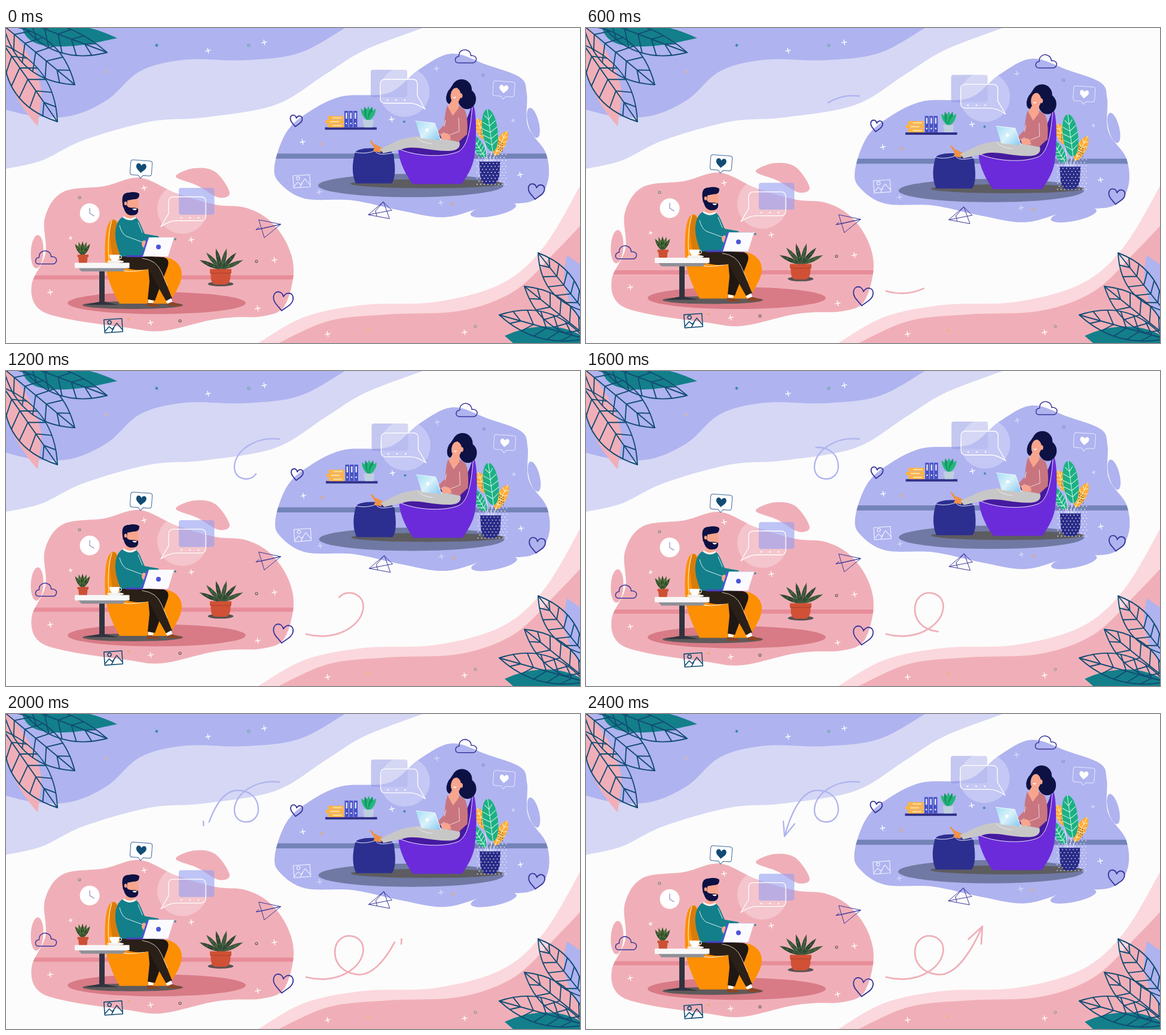
Recreate the animation shown at these times as an HTML page with a canvas. Size 960 by 528 pixels, loop 2.5 s.

```html
<!DOCTYPE html>
<html lang="en">
<head>
<meta charset="utf-8">
<title>Working from home</title>
<style>
html, body { margin: 0; width: 100%; height: 100%; overflow: hidden; background: #fcfcfc; }
canvas { display: block; }
</style>
</head>
<body>
<canvas id="stage" width="960" height="528"></canvas>
<script>
const ctx = document.getElementById('stage').getContext('2d');
const LOOP = 2500, STEP = 100, RISE = 18;
const LILAC = '#afb3ef', PALE = '#d5d7f5', PINK = '#f0afb8', BLUSH = '#fbd8dd',
  TEAL = '#137f8a', INK = '#124c74', NAVY = '#2c2f8f', INDIGO = '#3a379b',
  SKIN = '#f8a58d', WHITE = '#fff', HAIR = '#0d1143', MIST = '#d8daf9';

// Basic drawing helpers
const path = d => typeof d === 'string' ? new Path2D(d) : d;
const points = text => text.split(' ').map(p => p.split(',').map(Number));
function fill(d, color) {
  ctx.fillStyle = color;
  ctx.fill(path(d));
}
function line(d, color, w = 1.2) {
  ctx.strokeStyle = color;
  ctx.lineWidth = w;
  ctx.stroke(path(d));
}
function ellipse(x, y, rx, ry, color, turn = 0) {
  ctx.beginPath();
  ctx.ellipse(x, y, rx, ry, turn, 0, 7);
  ctx.fillStyle = color;
  ctx.fill();
}
const dot = (x, y, r, color) => ellipse(x, y, r, r, color);
function box(x, y, w, h, r, color) {
  const p = new Path2D();
  p.roundRect(x, y, w, h, r);
  fill(p, color);
}
function ring(x, y, color, r = 2) {
  ctx.beginPath();
  ctx.arc(x, y, r, 0, 7);
  ctx.strokeStyle = color;
  ctx.lineWidth = 1.1;
  ctx.stroke();
}
function pluses(text, color = WHITE, r = 4) {
  for (const [x, y] of points(text))
    line(`M${x - r} ${y + .8}l${2 * r} -1.6M${x - .8} ${y - r}l1.6 ${2 * r}`, color, 1.4);
}
function place(x, y, turn, size, draw) {
  ctx.save();
  ctx.translate(x, y);
  ctx.rotate(turn);
  ctx.scale(size, size);
  draw();
  ctx.restore();
}

// Smooth curve through "x,y x,y ..." key points
function spline(text, closed) {
  const pts = points(text), n = pts.length;
  const at = i => closed ? pts[(i + n) % n] : pts[Math.max(0, Math.min(n - 1, i))];
  const p = new Path2D();
  p.moveTo(...pts[0]);
  for (let i = 0; i < (closed ? n : n - 1); i++) {
    const [a, b, c, d] = [at(i - 1), at(i), at(i + 1), at(i + 2)];
    p.bezierCurveTo(b[0] + (c[0] - a[0]) / 6, b[1] + (c[1] - a[1]) / 6,
      c[0] - (d[0] - b[0]) / 6, c[1] - (d[1] - b[1]) / 6, c[0], c[1]);
  }
  if (closed) p.closePath();
  return p;
}
function wave(text, x, y) {
  const p = spline(text);
  p.lineTo(x, y);
  p.closePath();
  return p;
}

// Leaf from base to tip; up and down bulge its sides, a small `ends` rounds it
function leaf(ax, ay, bx, by, up, down, { color, vein, w = 1, n = 0, rim, ends = .33 }) {
  const len = Math.hypot(bx - ax, by - ay), c = ends * len, e = len - c;
  place(ax, ay, Math.atan2(by - ay, bx - ax), 1, () => {
    const edge = `M0 0C${c} ${-up} ${e} ${-up} ${len} 0C${e} ${down} ${c} ${down} 0 0`;
    if (color) fill(edge, color);
    if (rim) line(edge, vein, w);
    if (!vein) return;
    let d = `M0 0H${len}`;
    for (let i = 1; i <= n; i++) {
      const s = i / (n + 1) * .9, q = s + .11, k = 3 * q * (1 - q);
      d += `M${q * len} ${-k * up}L${s * len} 0L${q * len} ${k * down}`;
    }
    line(d, vein, w);
  });
}
function fan(x, y, n, spread, rx, ry, width, colors, vein) {
  for (let i = 0; i < n; i++) {
    const a = spread * (2 * i / (n - 1) - 1);
    leaf(x, y, x + rx * Math.sin(a), y - ry * Math.cos(a), width, width,
      { color: colors[i % 2], vein, w: .6, n: 2 });
  }
}

// Icons
const HEART = 'M0 .47C-.2 .25-.5 .1-.5-.18C-.5-.52-.12-.56 0-.25C.12-.56.5-.52.5-.18C.5 .1 .2 .25 0 .47Z';
const heart = (x, y, size, color) => place(x, y, .1, size, () => fill(HEART, color));
const heartLine = (x, y, size) => place(x, y, .13, size, () => line(HEART, INDIGO, 1.9 / size));
const cloud = (x, y) => place(x, y, 0, 1, () => line(
  'M-12 11C-19 11-19 1-11 0C-12-9-3-13 3-10C8-8 9-4 9-1C16-2 20 3 17 8C16 10 14 11 12 11Z', INDIGO, 1.5));
const picture = (x, y, size, color, w) => place(x, y, -.07, size, () => line(
  'M-15-11H15V11H-15ZM-3-6A3 3 0 1 1-9-6A3 3 0 1 1-3-6M-15 9L-7 1L-2 6L6-4L15 8M-4 11L1 3', color, w));
function heartBubble(x, y, bg, edge, color, size) {
  place(x, y, .07, 1, () => {
    const d = 'M-14-13H14Q18-13 18-9V8Q18 12 14 12H4L0 17L-4 12H-14Q-18 12-18 8V-9Q-18-13-14-13Z';
    if (bg) fill(d, bg);
    line(d, edge, 1);
  });
  heart(x, y, size, color);
}
// Speech bubble; flip is 1 for a tail on the right, -1 for the left
function chat(x, y, flip) {
  place(x, y, 0, 1, () => {
    ctx.scale(flip, 1);
    line('M-23-20H23Q31-20 31-12V8L44 30Q30 20 18 20H-23Q-31 20-31 12V-12Q-31-20-23-20Z', WHITE, 1.3);
  });
  for (let i = -1; i < 2; i++) dot(x + 5 * -flip * .9 + i * 14.5, y + 15, 1.3, WHITE);
}

function backdrop() {
  ctx.fillStyle = '#fcfcfc';
  ctx.fillRect(0, 0, 960, 528);
  fill(wave('697,0 600,37 535,77 450,129 330,150 240,157 130,188 60,222 0,236', 0, 0), PALE);
  fill(wave('567,0 490,42 400,54 300,53 225,72 170,120 110,147 50,148 0,137', 0, 0), LILAC);
  fill(wave('422,528 500,484 600,464 720,459 830,428 900,366 960,265', 960, 528), BLUSH);
  fill(wave('456,528 540,491 640,480 760,474 850,441 920,374 960,332', 960, 528), PINK);

  const lined = { vein: INK, w: 1.9, n: 5, rim: true };
  fill('M0 0H5C30 28 62 80 59 118L53 165C32 142 8 105 0 76Z', PINK);
  fill('M27 0C34 24 55 31 90 31C130 31 160 22 186 17C172 10 156 4 140 0Z', TEAL);
  leaf(20, -15, 169, 41, 20, 37, lined);
  leaf(-4, -4, 115, 95, 37, 38, lined);
  leaf(-4, 28, 86, 157, 33, 40, lined);

  fill('M938 381L960 396V490C940 462 930 430 934 402Z', LILAC);
  fill('M834 516C870 499 920 492 960 514V528H848Z', TEAL);
  leaf(968, 475, 890, 377, 30, 25, lined);
  leaf(975, 520, 867, 433, 30, 30, lined);
  leaf(968, 521, 825, 481, 25, 33, lined);

  pluses('338,38 432,24 538,513 767,510');
  pluses('252,29', TEAL, 2);
  ring(406, 29, '#61a9a5');
  ring(785, 500, '#8a9c7c');
  ring(168, 73, '#dfb99a');
  ring(606, 507, '#f3b06c');
}

// Floating ground with a wall line
function land(shape, x, y, w, h, color, stripe) {
  fill(shape, color);
  ctx.save();
  ctx.clip(shape);
  box(x, y, w, h, 0, stripe);
  ctx.restore();
}
const pinkLand = spline('65,318 95,275 165,265 224,251 285,277 350,296 400,301 440,322 470,362 481,410 465,467 430,483 380,485 340,490 260,508 200,502 100,487 53,469 43,430 66,378', true);
const lilacLand = spline('449,232 467,178 500,145 560,115 640,109 690,70 745,43 805,62 860,83 871,110 873,165 903,210 906,258 880,290 810,297 735,317 660,306 580,289 500,286 458,260', true);

function manRoom() {
  fill(spline('284,249 315,235 350,241 374,276 355,284 320,264', true), PINK);
  ellipse(52, 375, 10.5, 28, PINK, .05);
  land(pinkLand, 40, 414.5, 445, 7, PINK, '#e78d99');
  ellipse(252, 461, 149, 18.5, '#d87b86');
  ellipse(212, 464.5, 84, 6.5, '#5f5a5b');
  dot(140, 310.5, 16.5, WHITE);
  line('M140 302V310.5L147 315', '#8c8bc0');
  dot(295, 303, 42, 'rgba(255,255,255,.28)');
  box(289, 268, 59.5, 45, 4, 'rgba(150,158,242,.6)');
  chat(303, 303, -1);

  // Chair
  fill('M166 395C164 350 168 321 180 321C190 321 190 345 196 385L270 385C286 389 294 400 294 413C294 430 280 447 273 462H190C180 445 168 418 166 395Z', '#fd8f05');
  fill('M176 323C182 319 188 325 189 345L200 392L186 404C176 385 171 345 176 323Z', '#d87c0a');
  line('M177 323C170 345 170 375 173 395C190 412 215 410 245 402', '#fff3df', 1.1);

  // Legs
  fill('M190 381C210 380 250 384 263 384C272 386 273 393 270 401L249 457L237 455L240 425L238 403C220 406 200 405 191 396Z', '#1f1712');
  fill('M192 383C220 382 240 386 250 393C260 405 268 430 278 453L268 458C258 440 248 423 239 404C220 408 200 404 194 398Z', '#2b2017');
  line('M228 386Q252 389 260 409L270 432', '#e9d9c8', .9);
  fill('M238 455L247 457L245 463H238ZM267 458L276 453L279 460L271 463Z', WHITE);
  fill('M236 461H244L257 465V467H236ZM270 462L278 459L292 464V466H270Z', '#8b4526');

  // Body
  fill('M197 316C186 320 182 335 183 350C184 365 190 375 191 383H232L230 364L241 353L256 352L255 349L232 345C226 333 224 322 216 317Z', TEAL);
  line('M190 331Q193 344 201 349L231 360M221 326L228 343', '#d9f0ee', 1);
  fill('M201 310H215V319Q207 324 199 318Z', SKIN);
  line('M197 317Q207 324 216 318', '#f2f4f4', 3);
  fill('M202 286H221L222 302L212 308L202 301Z', SKIN);
  fill('M196 301C193 285 194 276 205 276C212 274 220 275 223 278C223 285 220 287 214 287L203 289L202 298Z', HAIR);
  fill('M196 296L202 297C205 304 213 299 221 303C222 311 218 314 210 314C201 314 197 306 196 296Z', HAIR);
  fill('M211 303Q215 302 219 303Q216 308 211 303Z', WHITE);
  ellipse(200, 294, 2.2, 3.2, SKIN);
  ellipse(231, 362, 4, 6, SKIN);

  // Laptop
  fill('M201 381H230V384H201Z', '#4b3fc4');
  fill('M236 351H280L270 383H226Z', '#4c55d8');
  fill('M239 351H281L271 383H229Z', '#fbfbff');
  dot(255, 367, 4, '#4c55d8');

  // Table and cup
  box(156, 406, 9, 56, 0, '#30333f');
  fill('M132 464Q146 461 156 459H166Q174 461 188 464Z', '#30333f');
  fill('M121 402H201L196 408H126Z', '#8f9097');
  box(115, 393.5, 91.5, 9, 1, '#f8f8f8');
  ellipse(183, 391.5, 14, 2.6, '#f2f0f0');
  ring(190, 384, WHITE, 3);
  fill('M173 380H190C190 386 188 391 182 391C176 391 173 386 173 380Z', WHITE);

  // Plants
  fan(128, 382, 5, .6, 22, 24, 3.5, ['#263f2a', '#385c2b'], '#6d8b45');
  fill('M119.5 380H138V384H136.5L135.5 393.5H122L121 384H119.5Z', '#cb5033');
  ellipse(359, 429, 21.5, 4, '#575253');
  fan(360, 405, 6, 1.12, 40, 36, 4.5, ['#293f30', '#365238'], '#607a4c');
  fill('M341 404H377V411H375.5C376 424 372 430 366 430H351C345 430 342 424 342.5 411H341Z', '#d05135');
  line('M342 411H376', '#a93d2a', .9);

  // Icons and specks
  heartBubble(226, 235, WHITE, '#41679a', INK, 17);
  line('M423 321.5L459.5 329L432 351.5L427.5 336.5ZM418 338L459.5 329L427.5 336.5L418 338L423 334', INDIGO, 1);
  cloud(66.5, 384.5);
  heartLine(463, 458.5, 33);
  picture(179.5, 499, 1, INK, 1.6);
  pluses('231,268 74,443 449,389 421,470 242,494 310,355');
  pluses('108,352', WHITE, 2.5);
  ring(123, 284, '#6d8d7c');
  ring(419, 391, '#5d5b40');
  ring(291, 491, '#5d5b40');
  ring(205, 488, '#eda84e', 1.5);
  ring(283, 354, TEAL, 1.2);
}

function womanRoom() {
  ellipse(882, 159, 9, 26, LILAC, -.25);
  ellipse(815, 305, 39, 10, LILAC, -.2);
  land(lilacLand, 445, 210.5, 465, 8.5, LILAC, '#7383b8');
  ellipse(677, 264, 155, 19.5, '#7079a3');
  ellipse(704, 261, 128, 7.5, '#5d5c60');
  box(610, 70, 61, 46, 4, 'rgba(142,148,230,.5)');
  dot(666.5, 107, 42, 'rgba(255,255,255,.28)');
  chat(657, 106, 1);

  // Shelf
  box(533.5, 166.5, 86.5, 4, 0, '#303087');
  for (let i = 0; i < 3; i++) {
    const x = 538 - i % 2 * 4, y = 147.5 + i * 6.5;
    box(x, y, 565 - x, 6, 2, '#ffb442');
    box(x + 8, y + 2, 15, 2, 0, '#ffe1a6');
    const b = 566 + i * 7.5;
    box(b, 139, 6.5, 27.5, 0, '#4651c4');
    box(b + 2, 142, 2.5, 10, 0, '#dfe3ff');
    dot(b + 3.2, 160, 1.2, WHITE);
  }
  fan(606, 156, 5, .6, 22, 25, 4.5, ['#24b879', '#159868']);
  fill('M596.5 154H615L613 166.5H599Z', '#bfcfe0');

  // Potted plant
  const gold = { color: '#ffae36', vein: '#fff0d2', w: .9, n: 4, ends: .1 };
  const green = { color: '#1cb084', vein: '#d7f8e9', w: 1, n: 5, ends: .03 };
  line('M800 186L806 228M818 213L812 228M812 205L809 228M800 216L805 228', '#eef6ff', 1);
  leaf(801, 187, 788, 152, 11, 11, gold);
  leaf(817, 214, 838, 173, 11, 11, gold);
  for (let i = 0; i < 12; i++) {
    dot(795 + i % 3 * 3, 170 + i, .8, '#333');
    dot(824 + i % 3 * 3, 190 + i * 1.5, .8, '#333');
  }
  leaf(814, 207, 805, 136, 17, 17, green);
  leaf(801, 217, 779, 180, 11, 11, green);
  fill('M791.5 224H826.5L825 248Q822 262 814 262H804Q795 262 793 248Z', '#292b88');
  for (let row = 0; row < 11; row++)
    for (let x = 788 + row % 2 * 3; x < 839; x += 6) dot(x, 212 + row * 5, .9, 'rgba(255,255,255,.85)');

  // Seats
  fill('M583 212C583 204 596 201 615 201.5C640 202 650 206 649 219C652 240 650 255 645 260.5H585C578 246 579 226 583 212Z', NAVY);
  line('M583 208C594 211 606 210 617 206C622 214 633 212 649 209', '#e4e5fb', 1);
  fill('M656 205L765 180C773 150 777 130 781 128C788 140 787 195 783 217C780 235 770 250 762 261.5H680C668 245 658 225 656 205Z', '#6b2bda');
  const seam = 'M660 204C690 216 735 217 757 207C775 196 777 160 780 131';
  fill(seam + 'L765 165Z', '#451a9f');
  line(seam, '#eee5ff', 1);

  // Body
  fill('M608 189Q612 188 615 194L630 201L626 209L614 206L616 201Z', '#f09145');
  fill('M733 186L757 188C763 200 754 206 740 206C710 207 690 197 665 202L631 210L625 203L650 191C675 179 705 180 733 186Z', '#c8c7c7');
  line('M686 183Q693 192 712 194', '#f1f0f0', .9);
  ellipse(762, 103, 17, 17, HAIR);
  ellipse(771, 119, 15, 17, HAIR);
  ellipse(746, 113, 9, 15, HAIR, .35);
  fill('M738 130C733 145 733 160 733 186L757 191L771 178C773 160 771 142 766 136L757 130L747 143Z', '#c87580');
  fill('M745 122H757V134L747 147L739 132Z', SKIN);
  ellipse(752, 113, 8.5, 13, SKIN, .1);
  fill('M742 108C742 92 760 88 766 100L763 112C760 106 757 101 753 100Q746 101 742 108Z', HAIR);
  fill('M746 115Q749 117 753 115Q751 121 746 115Z', WHITE);
  ellipse(761, 113.5, 2.5, 4, SKIN);
  fill('M733 162L736 172L724 180L720 176Z', '#c87580');
  fill('M757 149L766 147L771 179L742 188L738 182L758 174Z', '#c87580');
  line('M757 151L758 173L743 179M735 155L733 165', '#f4d5da', 1);
  fill('M726 179Q733 173 742 179L744 187H729Z', SKIN);

  // Laptop
  const shine = ctx.createLinearGradient(688, 156, 722, 188);
  ['#a9dff5', '#d9f2fb', '#8fcdf0'].forEach((c, i) => shine.addColorStop(i / 2, c));
  fill('M685 156L717 159.5L727 188L694 185Z', shine);
  line('M685 156L717 159.5L727 188', '#eefaff', 1);
  dot(704, 171, 2.7, WHITE);

  // Icons and specks
  cloud(768.5, 47.5);
  heartLine(485, 156, 20);
  heartLine(886.5, 274.5, 27);
  picture(494.5, 257, .93, '#eceeff', 1.3);
  heartBubble(832.5, 102.5, null, '#e6e7ff', WHITE, 15);
  line('M631 291.5L606 313L641 319.5ZM631 291.5L618 306.5M645 305.5L606 313M645 305.5L631 291.5M618 306.5L620 315', INDIGO, 1);
  pluses('645,153 496,191 860,246');
  pluses('720,68 524,275 727,293', MIST);
  pluses('848,155', MIST, 2.5);
  ring(798, 79, '#7a96b9');
  ring(527, 194, '#e4a96f');
  ring(747, 295, '#e4a96f');
  ring(666, 157, TEAL, 1.3);
}

// One looping arrow, drawn twice: as is, and turned around
const SHAFT = 'M0 0C-40-5-75 20-75 47C-75 60-66 67-55 67C-43 67-35 57-35 46C-35 26-50 14-70 14C-95 14-112 45-125 91';
const HEAD = 'M-127 66L-125 91L-108 70';
function trim(d, len, color) {
  if (len <= 0) return;
  ctx.setLineDash([len, 2000]);
  line(d, color, 2.3);
  ctx.setLineDash([]);
}
function arrows(t) {
  const u = t / 100 - 4;
  const shaft = u < -1.5 ? 0 : 25 + 14.4 * u + .14 * u * u;
  const head = 7 + (t - 2000) * .16;
  const arrow = color => () => {
    trim(SHAFT, shaft, color);
    trim(HEAD, head, color);
  };
  place(457, 114, 0, 1, arrow(LILAC));
  place(502, 441, 188.2 * Math.PI / 180, 1.177, arrow(PINK));
}

function draw(t) {
  const k = (1 - Math.cos(2 * Math.PI * t / LOOP)) / 2;
  backdrop();
  arrows(t);
  place(0, -RISE * k, 0, 1, manRoom);
  place(1.5 * k, RISE * k, 0, 1, womanRoom);
}

ctx.lineCap = ctx.lineJoin = 'round';
const start = performance.now();
let shown = -1;
function tick() {
  const step = Math.floor((performance.now() - start) % LOOP / STEP);
  if (step !== shown) draw((shown = step) * STEP);
  requestAnimationFrame(tick);
}
tick();
</script>
</body>
</html>
```
